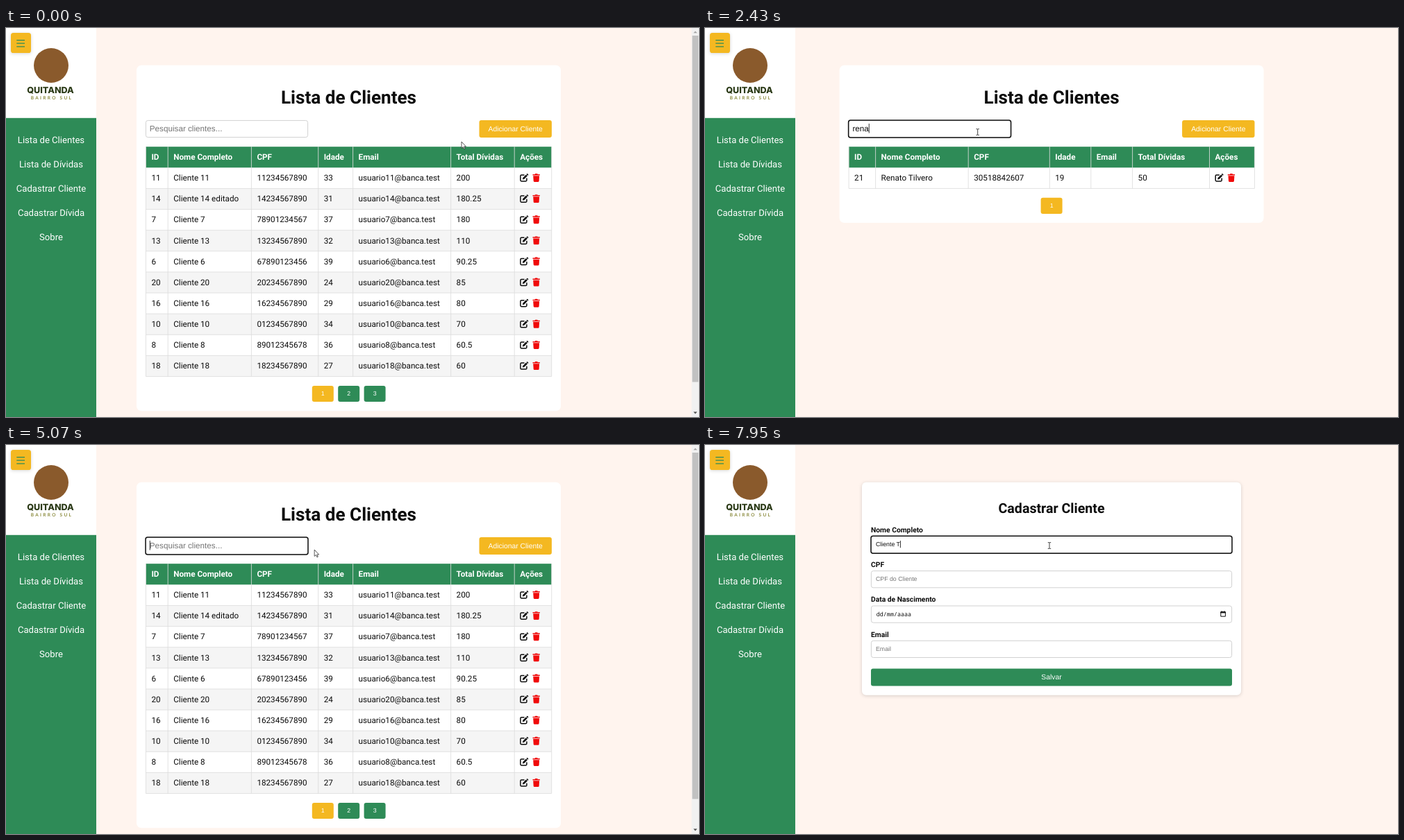
These frames come from a looping animation (998x561 px, 8 s). An HTML page:

```html
<!DOCTYPE html>
<html lang="pt-BR">
<head>
<meta charset="utf-8">
<title>Lista de Clientes</title>
<style>
html, body { margin: 0; width: 100%; height: 100%; overflow: hidden; background: #fff4ee; }
svg { display: block; width: 100%; height: 100%; }
text { font-family: Roboto, sans-serif; font-size: 11.69px; fill: #0c0c0c; white-space: pre; text-rendering: geometricPrecision; }
.b { font-weight: 700; }
.w { fill: #fff; }
.mid { text-anchor: middle; }
.ui { font-family: "Liberation Sans", Arial, sans-serif; }
.hint { fill: #757575; }
.shade { filter: drop-shadow(0 1.5px 2.5px rgba(0, 0, 0, .16)); }
</style>
</head>
<body>
<svg id="stage" viewBox="0 0 998 561"></svg>
<script>
const GREEN = '#2e8b57', YELLOW = '#f4b821', LINE = '#dddddd';
const LOOP = 8000, SHIFT = 5.6;
const stage = document.getElementById('stage');

const rect = (x, y, w, h, fill, extra = '') =>
  `<rect x="${x}" y="${y}" width="${w}" height="${h}" fill="${fill}" ${extra}/>`;
const text = (x, y, str, cls = '', size = 11.69, extra = '') =>
  `<text x="${x}" y="${y}" class="${cls}" style="font-size:${size}px" ${extra}>${str}</text>`;
const path = (d, fill, extra = '') => `<path d="${d}" fill="${fill}" ${extra}/>`;
const group = (id, body) => `<g id="${id}">${body}</g>`;
const at = (x, y, body) => `<g transform="translate(${x} ${y})">${body}</g>`;

function sidebar() {
  const links = ['Lista de Clientes', 'Lista de Dívidas', 'Cadastrar Cliente', 'Cadastrar Dívida', 'Sobre'];
  return rect(0, 0, 130, 561, GREEN) + rect(0, 0, 130, 129.8, '#fff') +
    '<circle cx="65" cy="54" r="25" fill="#8a5a2c"/>' +
    '<text x="64" y="93.5" class="mid" style="font:800 12.6px Inter,sans-serif;fill:#2b3a17">QUITANDA</text>' +
    '<text x="66" y="102.6" class="mid" style="font:700 6.5px Lato,sans-serif;letter-spacing:2.3px;fill:#8a8a3c">BAIRRO SUL</text>' +
    rect(7, 7, 29, 29, YELLOW, 'rx="3.6" class="shade"') +
    path('M15.3 17.6H27M15.3 22.2H27M15.3 26.8H27', 'none', `stroke="${GREEN}" stroke-width="1.2"`) +
    links.map((s, i) => text(65, 165.8 + i * 35.1, s, 'w mid', 13.1)).join('');
}

const editIcon =
  path('M6 2.2H2.3Q.9 2.2 .9 3.6V9.9Q.9 11.3 2.3 11.3H8.5Q9.9 11.3 9.9 9.9V7.4', 'none',
    'stroke="#0c0c0c" stroke-width="1.5" stroke-linecap="round"') +
  path('M3.8 8.7L4.3 6.4L9 1.7L10.9 3.6L6.2 8.3ZM9.5 1.2L10.1.6Q10.7.1 11.2.6L12 1.4Q12.5 2 12 2.5L11.4 3.1Z', '#0c0c0c');
const trashIcon = path('M0 1.2H3L3.6.3H6.7L7.3 1.2H10.3V2.7H0ZM.7 3.5H9.6L9.1 11.1Q9 12.2 7.9 12.2H2.4Q1.3 12.2 1.2 11.1Z', '#f00a0a');

function table(cols, rows) {
  const heads = ['ID', 'Nome Completo', 'CPF', 'Idade', 'Email', 'Total Dívidas', 'Ações'];
  const top = 171.2, step = 30.12, left = cols[0], right = cols[7];
  const bottom = top + step * (rows.length + 1);
  let out = rect(left, top, right - left, step, GREEN);
  heads.forEach((s, i) => out += text(cols[i] + 8, 190.2, s, 'b w'));
  let lines = '';
  rows.forEach((row, r) => {
    const y = top + step * (r + 1);
    if (r % 2) out += rect(left, y, right - left, step, '#f5f5f5');
    row.forEach((s, i) => out += text(cols[i] + 8, y + 18.9, s));
    out += at(cols[6] + 7.8, y + 8.4, editIcon) + at(cols[6] + 26.3, y + 8.4, trashIcon);
    lines += `M${left} ${y + step}H${right}`;
  });
  cols.forEach(x => lines += `M${x} ${top}V${bottom}`);
  return out + path(lines, 'none', `stroke="${LINE}" stroke-width=".85"`);
}

const pageButton = (x, y, label, fill) =>
  rect(x, y, 31, 23.2, fill, 'rx="3"') + text(x + 15.5, y + 14.2, label, 'ui w mid', 8.8);

const card = (x, h) => rect(x, 53.7, 611, h, '#fff', 'rx="7"') +
  text(x + 305.5, 108.7, 'Lista de Clientes', 'b mid', 26.1);

function fullList() {
  const people = [
    [11, '11234567890', 33, '200'], [14, '14234567890', 31, '180.25'],
    [7, '78901234567', 37, '180'], [13, '13234567890', 32, '110'],
    [6, '67890123456', 39, '90.25'], [20, '20234567890', 24, '85'],
    [16, '16234567890', 29, '80'], [10, '01234567890', 34, '70'],
    [8, '89012345678', 36, '60.5'], [18, '18234567890', 27, '60']];
  const rows = people.map(([id, cpf, age, debt]) =>
    [id, `Cliente ${id}${id === 14 ? ' editado' : ''}`, cpf, age, `usuario${id}@banca.test`, debt]);
  return card(188, 498.5) +
    table([201.4, 233.2, 353.4, 449.7, 499.6, 640.6, 732.2, 785.7], rows) +
    [1, 2, 3].map((n, i) => pageButton(440.8 + i * 37.4, 515.9, n, i ? GREEN : YELLOW)).join('') +
    rect(987.4, 0, 10.6, 561, '#f1f1f1') + rect(988.3, 11, 8.8, 499.5, '#c1c1c1') +
    path('M990 7.2L992.7 4.4L995.4 7.2Z', '#a3a3a3') + path('M990 553.6L992.7 556.4L995.4 553.6Z', '#505050');
}

const foundList = () => card(193.6, 227.3) +
  table([207.1, 245.6, 379.2, 496.3, 555.8, 615.6, 726.5, 791.4],
    [[21, 'Renato Tilvero', '30518842607', 19, '', '50']]) +
  pageButton(483.6, 244.7, 1, YELLOW);

const field = (x, y, w) =>
  rect(x + .4, y + .4, w - .8, 24.2, '#fff', 'rx="3" stroke="#cccccc" stroke-width=".9"');

// Typed text, caret and focus ring of a live field.
const entry = (id, x, y, w, textX, baseline, size) =>
  rect(x, y, w, 25, 'none', `id="${id}Ring" rx="3" stroke="#101010" stroke-width="1.5"`) +
  text(textX, baseline, '', 'ui', size, `id="${id}"`) +
  rect(textX, baseline - size * .95, .8, size * 1.17, '#000', `id="${id}Caret"`);

const toolbar = () => field(201, 133, 234) + entry('search', 201, 133, 234, 206.8, 149, 11.69) +
  rect(681.5, 133, 104.4, 25, YELLOW, 'id="add" rx="3"') +
  text(733.7, 148.6, 'Adicionar Cliente', 'ui w mid', 10.35);

function form() {
  const labels = ['Nome Completo', 'CPF', 'Data de Nascimento', 'Email'];
  const hints = ['', 'CPF do Cliente', '', 'Email'];
  const tops = [131.2, 181.2, 231.6, 281.9];
  return rect(226, 53.7, 546, 307, '#fff', 'rx="6" class="shade"') +
    text(499, 98.4, 'Cadastrar Cliente', 'b mid', 19.6) +
    tops.map((y, i) => text(239, y - 5.4, labels[i], 'b', 10.3) + field(239, y, 520) +
      text(246, y + 15.1, hints[i], 'ui hint', 8.77)).join('') +
    entry('name', 239, tops[0], 520, 246, 146.3, 8.77) +
    '<text x="246.8" y="246.7" style="font:8.4px \'Noto Sans Mono\',monospace">dd/mm/aaaa</text>' +
    path('M742.8 240.9H749.4V247.2H742.8ZM744.4 239.2V241M747.8 239.2V241', 'none', 'stroke="#111" stroke-width="1"') +
    rect(742.3, 240.4, 7.6, 2, '#111') +
    rect(239, 322.6, 520, 25, GREEN, 'rx="3"') + text(499, 338.4, 'Salvar', 'ui w mid', 10.35);
}

const pointers =
  group('arrow', path('M0 0V9.4L2.2 7.5L3.8 10.8L5.2 10.1L3.7 7H6.5Z', '#fff', 'stroke="#222" stroke-width=".75"')) +
  group('beam', path('M-2.2 -4.4H-.6L0 -4L.6 -4.4H2.2M0 -4V4M-2.2 4.4H-.6L0 4L.6 4.4H2.2', 'none', 'stroke="#333" stroke-width=".95"')) +
  group('hand', path('M-.8.8Q-.8-.3.1-.3Q1-.3 1 .8V4Q1.2 3.4 2 3.6Q2.6 3.7 2.7 4.2Q3.2 3.7 3.9 4Q4.4 4.2 4.4 4.7Q5.8 4.3 5.9 5.6V8Q5.9 9.6 4.9 11H.3Q-.9 9-2.4 7Q-2.9 6.1-2.2 5.8Q-1.5 5.6-.8 6.5Z',
    '#fff', 'stroke="#222" stroke-width=".8"'));

stage.innerHTML = rect(0, 0, 998, 561, '#fff4ee') + group('list', fullList()) + group('found', foundList()) +
  group('toolbar', toolbar()) + group('form', form()) + sidebar() + group('pointer', pointers);

const el = id => document.getElementById(id);
const show = (id, on) => el(id).setAttribute('visibility', on ? 'inherit' : 'hidden');

const FILTERED = 2250, RESTORED = 4100, FORM_OPEN = 6030;
const SEARCH_KEYS = [[1300, ''], [1560, 'r'], [1690, 're'], [1820, 'ren'], [1950, 'rena'],
  [3360, 'ren'], [3490, 're'], [3620, 'r'], [3750, '']];
const NAME_KEYS = [[7050, ''], ...[...'Cliente T'].map((c, i) => [7200 + i * 90, 'Cliente T'.slice(0, i + 1)])];
const ROUTE = [[0, 656, 164], [120, 656, 164], [840, 414, 153], [960, 414, 153], [1230, 392.7, 150],
  [4900, 392.7, 150], [5580, 718.5, 156.7], [6060, 718.5, 156.7], [6240, 723.3, 156.4],
  [6580, 723.3, 156.4], [7020, 496, 145]];

function pointerAt(t) {
  const i = ROUTE.findIndex(p => p[0] > t);
  if (i < 0) return ROUTE[ROUTE.length - 1].slice(1);
  const [t0, x0, y0] = ROUTE[i - 1], [t1, x1, y1] = ROUTE[i];
  const u = (t - t0) / (t1 - t0), e = u * u * (3 - 2 * u);
  return [x0 + (x1 - x0) * e, y0 + (y1 - y0) * e];
}

function drawEntry(id, keys, hint, t, open) {
  const key = keys.filter(k => k[0] <= t).pop();
  const value = key ? key[1] : '', node = el(id);
  node.textContent = value || hint;
  node.setAttribute('class', value ? 'ui' : 'ui hint');
  const end = value ? node.getComputedTextLength() : 0;
  el(id + 'Caret').setAttribute('x', +node.getAttribute('x') + end);
  show(id + 'Caret', open && key && (t - key[0]) % 1000 < 500);
  show(id + 'Ring', open && key);
}

function draw(t) {
  const onForm = t >= FORM_OPEN, found = t >= FILTERED && t < RESTORED;
  show('list', !onForm && !found);
  show('found', found);
  show('toolbar', !onForm);
  show('form', onForm);
  el('toolbar').setAttribute('transform', `translate(${found ? SHIFT : 0} 0)`);
  drawEntry('search', SEARCH_KEYS, 'Pesquisar clientes...', t, !onForm);
  drawEntry('name', NAME_KEYS, 'Nome Completo', t, onForm);

  const [x, y] = pointerAt(t);
  const inside = (l, r) => x > l && x < r && y > 131 && y < 158;
  const overAdd = !onForm && inside(682, 786);
  const overField = onForm ? inside(239, 759) : inside(201, 435);
  el('add').setAttribute('fill', overAdd ? '#4caf50' : YELLOW);
  el('pointer').setAttribute('transform', `translate(${x} ${y})`);
  show('hand', overAdd);
  show('beam', overField);
  show('arrow', !overAdd && !overField);
}

const start = performance.now();
function tick() {
  draw((performance.now() - start) % LOOP);
  requestAnimationFrame(tick);
}
tick();
</script>
</body>
</html>
```
